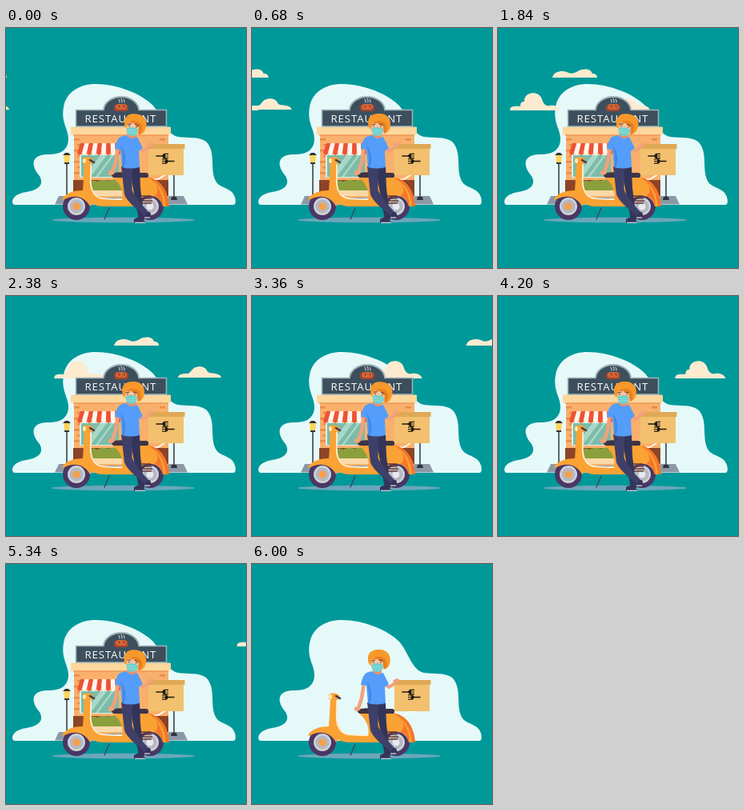
These frames come from a looping animation (300x300 px, 6.02 s). An HTML page:

```html
<!DOCTYPE html>
<html lang="en">
<head>
<meta charset="utf-8">
<title>Restaurant delivery</title>
<style>
html, body { margin: 0; width: 100%; height: 100%; overflow: hidden; background: #00999a; }
svg { display: block; width: 100%; height: 100%; }
.sign { font: 13.2px "Open Sans", "Noto Sans", sans-serif; letter-spacing: .9px; fill: #fff; }
.line { fill: none; stroke-linecap: round; stroke-linejoin: round; }
</style>
</head>
<body>
<svg viewBox="0 0 300 300">
  <defs>
    <g id="fork">
      <path class="line" d="M0 0H8" stroke="#20180f" stroke-width="1.5"/>
      <path d="M7 0Q8-3 10-3.2H15V-2H11V-.6H15V.6H11V2H15V3.2H10Q8 3 7 0Z" fill="#20180f"/>
    </g>
    <g id="lamp">
      <path d="M0 13V55" stroke="#30343c" stroke-width="1.5"/>
      <path d="M-3 55H3L4 59H-4Z" fill="#30343c"/>
      <path d="M-4 3H4L3 13H-3Z" fill="#ffd45b"/>
      <path d="M-5 3L-2 0H2L5 3ZM-3 12H3V14H-3Z" fill="#30343c"/>
    </g>
  </defs>

  <rect width="300" height="300" fill="#00999a"/>
  <path fill="#e6f9f9" d="M11 221Q8 221 8 217C9 208 20 206 30 204C43 201 47 194 42 185C35 177 30 165 41 160C51 156 59 160 69 155C78 150 80 140 76 128C72 117 70 110 72 99C75 80 92 70 112 70C139 70 169 82 184 97C196 111 200 133 215 136C228 138 240 135 250 142C264 155 253 180 264 194C270 201 286 200 287 216Q287 221 284 221Z"/>

  <g fill="#fdebd0">
    <path id="cloudHigh" d="M0 62C2 54 12 53 18 55C24 58 26 57 32 54C40 50 48 51 50 57C54 57 56 59 56 62Z"/>
    <path id="cloudLow" d="M0 103C0 98 4 97.5 13 98C13 93 15 92 18 92C17 80 36 77 40 89C42 96 46 98 50 97C57 96 62 99 63 103Z"/>
    <path id="cloudMid" d="M0 102C1 97 7 97 12 97C15 97 16 93 20 90C26 87 34 88 36 93C38 97 42 96 47 97C52 98 54 100 54 102Z"/>
  </g>

  <g id="restaurant">
    <path d="M66 210H222L227 220.5H61Z" fill="#8d98a7"/>
    <rect x="85" y="132" width="118" height="80" fill="#f9b06c"/>
    <g id="bricks" fill="#ea8a4a"></g>
    <rect x="81" y="123.5" width="125" height="10" rx="1" fill="#fdd79c"/>
    <path d="M84 134H203" stroke="#ef9c58" stroke-width="1.5"/>
    <rect x="92" y="158" width="49" height="29" fill="#d8eee4"/>
    <rect x="94" y="159" width="47" height="27" fill="#7dbca9"/>
    <path d="M97 186L118 159H126L106 186ZM112 186L132 159H135L115 186Z" fill="#a9d8c8"/>
    <rect x="84" y="190" width="119" height="20" fill="#8b4427"/>
    <rect x="103" y="203" width="46" height="7" fill="#fbd9a8"/>
    <path d="M102 203V194Q108 188 114 192Q121 188 128 191Q137 187 146 193V203Z" fill="#8ba03c"/>
    <g id="awning"></g>
    <path d="M122 103A22 17 0 0 1 166 103Z" fill="#3d4f5d" stroke="#9fb4b9" stroke-width="2"/>
    <rect x="87.5" y="102.5" width="113" height="20.5" fill="#3d4f5d" stroke="#9fb4b9" stroke-width="1.5"/>
    <path d="M123 101H165V105H123Z" fill="#3d4f5d"/>
    <rect x="135" y="95.5" width="18" height="8.5" rx="4" fill="#a9432a"/>
    <rect x="137" y="95" width="14" height="7" rx="3.5" fill="#d0663a"/>
    <path class="line" d="M141 97L142 99M147 97L148 99" stroke="#8a321f" stroke-width="1.2"/>
    <path class="line" d="M141 89Q143 91 142 93M144 88Q146 91 145 93M147 89Q149 91 148 93" stroke="#fff" stroke-width=".8"/>
    <text class="sign" x="98.5" y="118.3">RESTAURANT</text>
    <use href="#lamp" x="76" y="156"/>
    <use href="#lamp" x="210" y="156"/>
  </g>

  <ellipse cx="146.5" cy="240" rx="89.5" ry="3.3" fill="#6ba6ba"/>

  <g id="scooter">
    <path class="line" d="M129 225L123 239" stroke="#44415a" stroke-width="1.3"/>
    <path class="line" d="M178 189H190L198 184" stroke="#fff" stroke-width="1.5"/>
    <g id="wheels"></g>
    <path d="M98 169L106 168C107 183 104 198 111 207C116 214 124 214 145 214L151 223H120C106 222 101 214 96 205Z" fill="#fba234"/>
    <path class="line" d="M106 170C107 184 103 197 110 207C116 215 126 214 146 214" stroke="#fff0d4" stroke-width="1.8"/>
    <path d="M70 214C74 206 86 203 96 203L100 188L106 207C110 215 108 221 105 223C99 211 85 207 72 215Z" fill="#fba234"/>
    <path d="M133 186H177C193 189 202 203 204 223H196C193 212 185 209 177 210C168 211 164 217 163 223H143C148 210 147 198 133 186Z" fill="#fba234"/>
    <path d="M178 187C193 189 203 204 204 223H196C194 213 190 211 185 210C193 206 190 194 178 187Z" fill="#f4762b"/>
    <path d="M182 190C192 195 199 208 200 223H197C196 208 191 198 182 190Z" fill="#fba234"/>
    <path d="M165 210H181M165 213H182M166 216H183M167 219H182" stroke="#6b3a35" stroke-width="1.3"/>
    <path d="M132 182Q140 179 151 181H176Q180 183 177 187H135Q131 186 132 182Z" fill="#3d3446"/>
    <path d="M96 163Q102 159 109 164L110 168L104 171L96 169Z" fill="#fba234"/>
    <ellipse cx="98" cy="166" rx="1.8" ry="3" fill="#fff0bd"/>
    <path class="line" d="M105 165L110 168" stroke="#443b52" stroke-width="2.6"/>
  </g>

  <g id="courier">
    <path d="M154 173H167L168 200L173 240H166L160 206Z" fill="#33345a"/>
    <path d="M144 173H158L157.5 202Q161 212 180 232L176 236Q152 219 148 208Z" fill="#3f4069"/>
    <path d="M160 239Q166 235 169 238L174 242V244H160Z" fill="#33345a"/>
    <path d="M176 231L180 230Q182 234 180 237L172 237Z" fill="#33345a"/>
    <path d="M161 243.3H174M173 237H180" stroke="#fff" stroke-width="1.1"/>
    <path class="line" d="M140 149L137 168L133 180" stroke="#f2a17c" stroke-width="4.5"/>
    <path d="M128 179Q133 177 136 181Q133 186 128 183Z" fill="#f2a17c"/>
    <path class="line" d="M165 149L171 154L181 148" stroke="#f2a17c" stroke-width="4"/>
    <path d="M149 134Q158 138 164 136L171 150L166 154L167 174Q156 177 145 174L143 152L136 151Q138 139 143 136Z" fill="#549dfa"/>
    <path d="M143 146Q148 160 145 174L147 174.5Q153 160 143 146Z" fill="#4088e6"/>
    <g id="head">
      <path d="M151 128H162V136Q156 141 151 135Z" fill="#e98f70"/>
      <path d="M147 118Q147 112 157 113Q167 113 167 122Q166 134 157 135Q148 133 147 118Z" fill="#ffc39b"/>
      <path d="M147 126C142 114 148 107 158 107C169 106 176 115 172 126Q170 131 165 132L164 123Q157 117 150 119L149 126Z" fill="#f8982a"/>
      <path d="M150 119Q158 113 166 118Q170 122 168 130L165 132L164 123Q157 117 150 119Z" fill="#e9801f"/>
      <path class="line" d="M150 121L154 120M159 120L163 121" stroke="#593b35" stroke-width="1.1"/>
      <circle cx="152" cy="123" r=".8" fill="#403238"/>
      <circle cx="161" cy="123" r=".8" fill="#403238"/>
      <path d="M149 126Q157 122 164 126L163 132Q157 138 151 133Z" fill="#6fcfcb"/>
      <path class="line" d="M151 128H162M151 131H162" stroke="#9be2dc" stroke-width=".8"/>
    </g>
  </g>

  <g id="parcel">
    <rect x="178" y="149" width="44" height="35" fill="#f2c06e"/>
    <rect x="177" y="145" width="46.5" height="6" fill="#dfa956"/>
    <use href="#fork" x="188" y="160"/>
    <use href="#fork" transform="translate(210 166.5) scale(-1 1)"/>
    <path d="M176 146Q180 142 184 144L182 149L177 150Z" fill="#f2a17c"/>
  </g>
</svg>
<script>
const LOOP = 6020, TRAVEL = 6000;
const byId = id => document.getElementById(id);
const smooth = s => {
  s = Math.min(1, Math.max(0, s));
  return s * s * (3 - 2 * s);
};

// Start position, distance and head start of each cloud.
const clouds = [
  { node: byId("cloudHigh"), from: -55, distance: 547, lead: 0 },
  { node: byId("cloudLow"), from: -68, distance: 369, lead: 0 },
  { node: byId("cloudMid"), from: -59, distance: 605, lead: 430 }
];
const restaurant = byId("restaurant");
const head = byId("head");

function addShape(parent, tag, attributes) {
  const node = document.createElementNS("http://www.w3.org/2000/svg", tag);
  for (const name in attributes) node.setAttribute(name, attributes[name]);
  parent.append(node);
}

function addWheel(cx, hub) {
  const rings = [[17, "#4a3763"], [11, "#cfd2d8"], [8.5, "#b4b8c2"], [4.5, hub]];
  for (const [r, fill] of rings) addShape(byId("wheels"), "circle", { cx, cy: 223, r, fill });
}
addWheel(88, "#f6a04a");
addWheel(180, "#e8e8ef");

for (let i = 0; i < 7; i++) {
  const shift = i % 2 * 4;
  for (const left of [85, 192]) {
    addShape(byId("bricks"), "rect", { x: left + shift, y: 138 + i * 7, width: 7, height: 2.5 });
  }
}
for (let i = 0; i < 9; i++) {
  const top = 93 + i * 5.4, bottom = 89 + i * 6;
  addShape(byId("awning"), "path", {
    d: `M${top} 144h5.4L${bottom + 6} 156q-3 6-6 0Z`,
    fill: i % 2 ? "#fff5ed" : "#ee5236"
  });
}

function draw(time) {
  for (const { node, from, distance, lead } of clouds) {
    const x = from + distance * smooth((time + lead) / TRAVEL);
    node.setAttribute("transform", `translate(${x} 0)`);
  }
  const tilt = 4 + 5 * Math.cos(time / LOOP * 7 * Math.PI);
  head.setAttribute("transform", `rotate(${tilt} 157 136)`);
  restaurant.style.display = time < TRAVEL ? "" : "none";
}

const start = performance.now();
function tick() {
  draw((performance.now() - start) % LOOP);
  requestAnimationFrame(tick);
}
tick();
</script>
</body>
</html>
```
